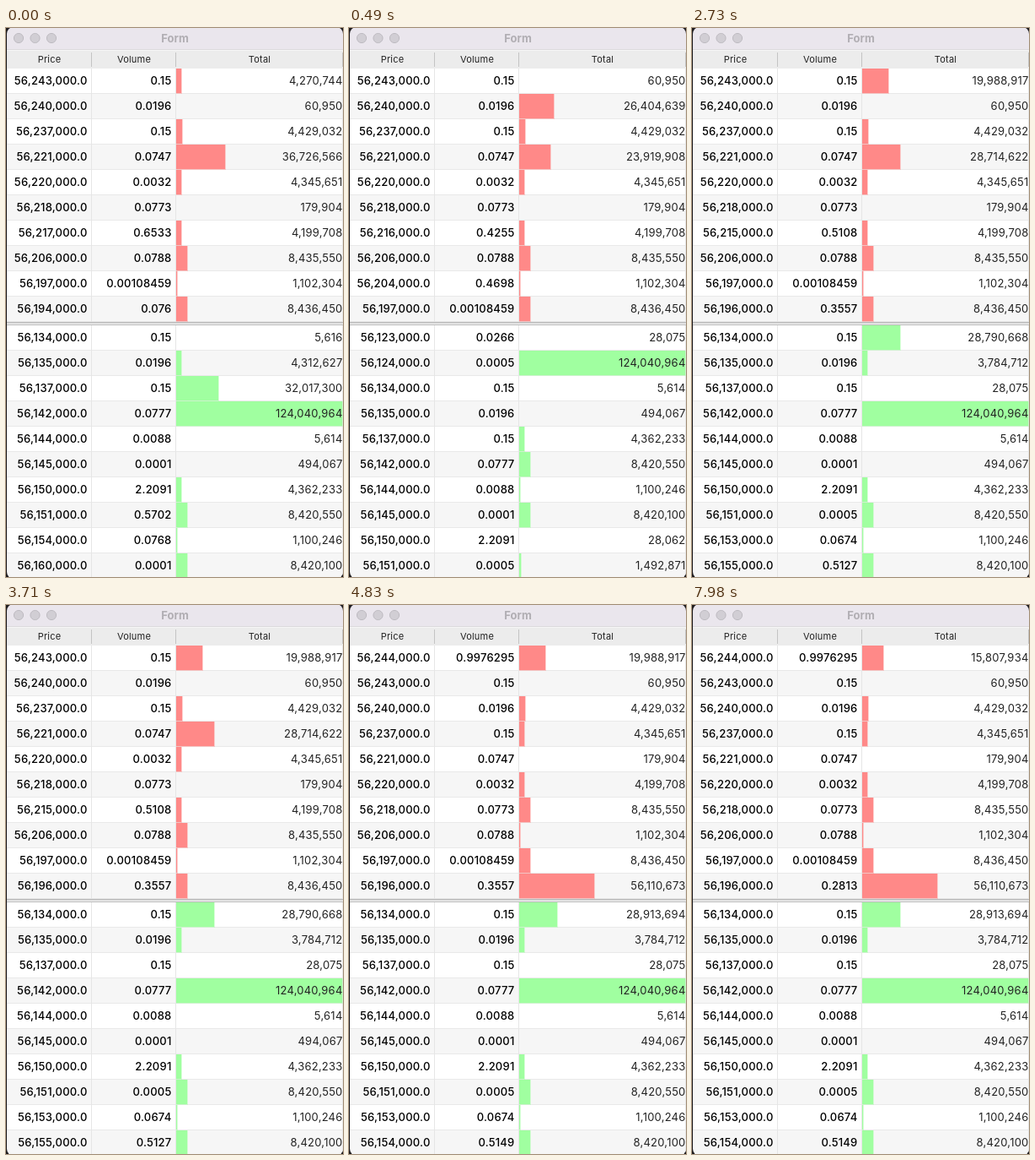
An HTML page with a canvas that plays this animation: 400 by 650 pixels, repeating every 8 s.

```html
<!DOCTYPE html>
<html lang="en">
<head>
<meta charset="utf-8">
<title>Order book</title>
<style>
  html, body { margin: 0; width: 100%; height: 100%; overflow: hidden; background: #1c1a1d; }
  canvas { display: block; width: 400px; height: 650px; }
</style>
</head>
<body>
<canvas id="stage"></canvas>
<script>
const W = 400, H = 650, LOOP = 8000;
const ROW = 30, ASK_TOP = 48, BID_TOP = 352;
const BAR_X = 202, BAR_W = 197;
const FONT = 'Inter, Roboto, sans-serif';

const canvas = document.getElementById('stage');
const scale = window.devicePixelRatio || 1;
canvas.width = W * scale;
canvas.height = H * scale;
const ctx = canvas.getContext('2d');
ctx.scale(scale, scale);

// Standing orders, as price (thousands above 56,000,000) to volume.
const asks = {
  243: 0.15, 240: 0.0196, 237: 0.15, 221: 0.0747,
  220: 0.0032, 218: 0.0773, 206: 0.0788, 197: 0.00108459
};
const bids = {
  134: 0.15, 135: 0.0196, 137: 0.15, 142: 0.0777,
  144: 0.0088, 145: 0.0001, 150: 2.2091, 151: 0.0005
};

// Totals that stay in the book; the others are put in between them.
const askTotals = [60950, 4429032, 4345651, 179904, 4199708, 8435550, 1102304, 8436450];
const maxTotal = 124040964;
const bidTotals = [maxTotal, 5614, 494067, 4362233, 8420550, 1100246, 8420100];

// Each update adds its own orders and totals to the standing ones.
const updates = [
  {
    at: 0,
    asks: { 217: 0.6533, 194: 0.076 }, askTotals: { 0: 4270744, 3: 36726566 },
    bids: { 151: 0.5702, 154: 0.0768, 160: 0.0001 }, first: [5616, 4312627, 32017300]
  },
  {
    at: 490,
    asks: { 216: 0.4255, 204: 0.4698 }, askTotals: { 1: 26404639, 3: 23919908 },
    bids: { 123: 0.0266, 124: 0.0005 }, first: [28075], last: [28062, 1492871]
  },
  {
    at: 2730,
    asks: { 215: 0.5108, 196: 0.3557 }, askTotals: { 0: 19988917, 3: 28714622 },
    bids: { 153: 0.0674, 155: 0.5127 }, first: [28790668, 3784712, 28075]
  },
  {
    at: 4830,
    asks: { 244: 0.9976295, 196: 0.3557 }, askTotals: { 0: 19988917, 9: 56110673 },
    bids: { 153: 0.0674, 154: 0.5149 }, first: [28913694, 3784712, 28075]
  }
];
updates.push({
  ...updates[3], at: 6790,
  asks: { 244: 0.9976295, 196: 0.2813 }, askTotals: { 0: 15807934, 9: 56110673 }
});

function insertAt(list, extra) {
  const result = [...list];
  for (const [index, value] of Object.entries(extra)) result.splice(index, 0, value);
  return result;
}

function makeRows(orders, totals, direction) {
  return Object.keys(orders)
    .sort((a, b) => direction * (a - b))
    .map((price, i) => ({
      price: `56,${price},000.0`, volume: String(orders[price]), total: totals[i]
    }));
}

const states = updates.map(u => ({
  at: u.at,
  asks: makeRows({ ...asks, ...u.asks }, insertAt(askTotals, u.askTotals), -1),
  bids: makeRows({ ...bids, ...u.bids }, [...u.first, ...bidTotals, ...(u.last || [])], 1)
}));

function rect(color, x, y, w, h) {
  ctx.fillStyle = color;
  ctx.fillRect(x, y, w, h);
}

function text(str, x, y, align, color, size = 13, weight = 400, spacing = 0.22) {
  ctx.font = `${weight} ${size}px ${FONT}`;
  ctx.letterSpacing = spacing + 'px';
  ctx.textAlign = align;
  ctx.fillStyle = color;
  ctx.fillText(str, x, y);
}

function drawTitleBar() {
  rect('#eae6ed', 0, 0, W, 25);
  for (let i = 0; i < 3; i++) {
    ctx.beginPath();
    ctx.arc(15 + i * 19.5, 12, 5.6, 0, Math.PI * 2);
    ctx.fillStyle = '#d1ced4';
    ctx.fill();
    ctx.lineWidth = 1;
    ctx.strokeStyle = '#bdbac0';
    ctx.stroke();
  }
  text('Form', 200.5, 16.5, 'center', '#b1aeb3', 13, 700, 0);
}

function drawHeader() {
  rect('#dcdadd', 0, 25, W, 1);
  rect('#f6f6f6', 0, 26, W, 1);
  rect('#ececec', 0, 27, W, 21);
  for (const x of [101, 201, 399]) rect('#c4c4c4', x, 29, 1, 17);
  text('Price', 51.5, 41, 'center', '#222', 11);
  text('Volume', 152, 41, 'center', '#222', 11);
  text('Total', 301, 41, 'center', '#222', 11);
}

// A solid bar with a soft one-pixel edge.
function drawBar(color, y, total) {
  const width = Math.floor(total / maxTotal * BAR_W);
  if (!width) return;
  ctx.globalAlpha = 0.4;
  rect(color, BAR_X, y, width + 1, ROW);
  ctx.globalAlpha = 1;
  rect(color, BAR_X, y, width, ROW - 1);
}

function drawTable(rows, top, barColor) {
  rows.forEach((row, i) => {
    const y = top + i * ROW;
    rect(i % 2 ? '#f6f6f6' : '#fff', 0, y, W, ROW);
    rect('#e9e9e9', 0, y + ROW - 1, W, 1);
    for (const x of [101, 201, 399]) rect('#e6e6e6', x, y, 1, ROW);
    drawBar(barColor, y, row.total);
    text(row.price, 96.5, y + 19, 'right', '#000', 13, 500);
    text(row.volume, 196.5, y + 19, 'right', '#000', 13, 500);
    text(row.total.toLocaleString('en-US'), 399.5, y + 19, 'right', '#222');
  });
}

function drawSplitter() {
  ['#bdbdbd', '#d2d2d2', '#f4f4f4', '#b9b9b9'].forEach((color, i) => rect(color, 0, 348 + i, W, 1));
}

function draw(time) {
  const state = states.filter(s => s.at <= time).pop();
  rect('#1c1a1d', 0, 0, W, H);
  ctx.save();
  ctx.beginPath();
  ctx.roundRect(1, -1, 399, 653, 8);
  ctx.clip();
  drawTitleBar();
  drawHeader();
  drawTable(state.asks, ASK_TOP, '#ff8988');
  drawTable(state.bids, BID_TOP, '#a0ffa0');
  drawSplitter();
  ctx.restore();
}

const start = performance.now();
function tick() {
  draw((performance.now() - start) % LOOP);
  requestAnimationFrame(tick);
}
tick();
</script>
</body>
</html>
```
